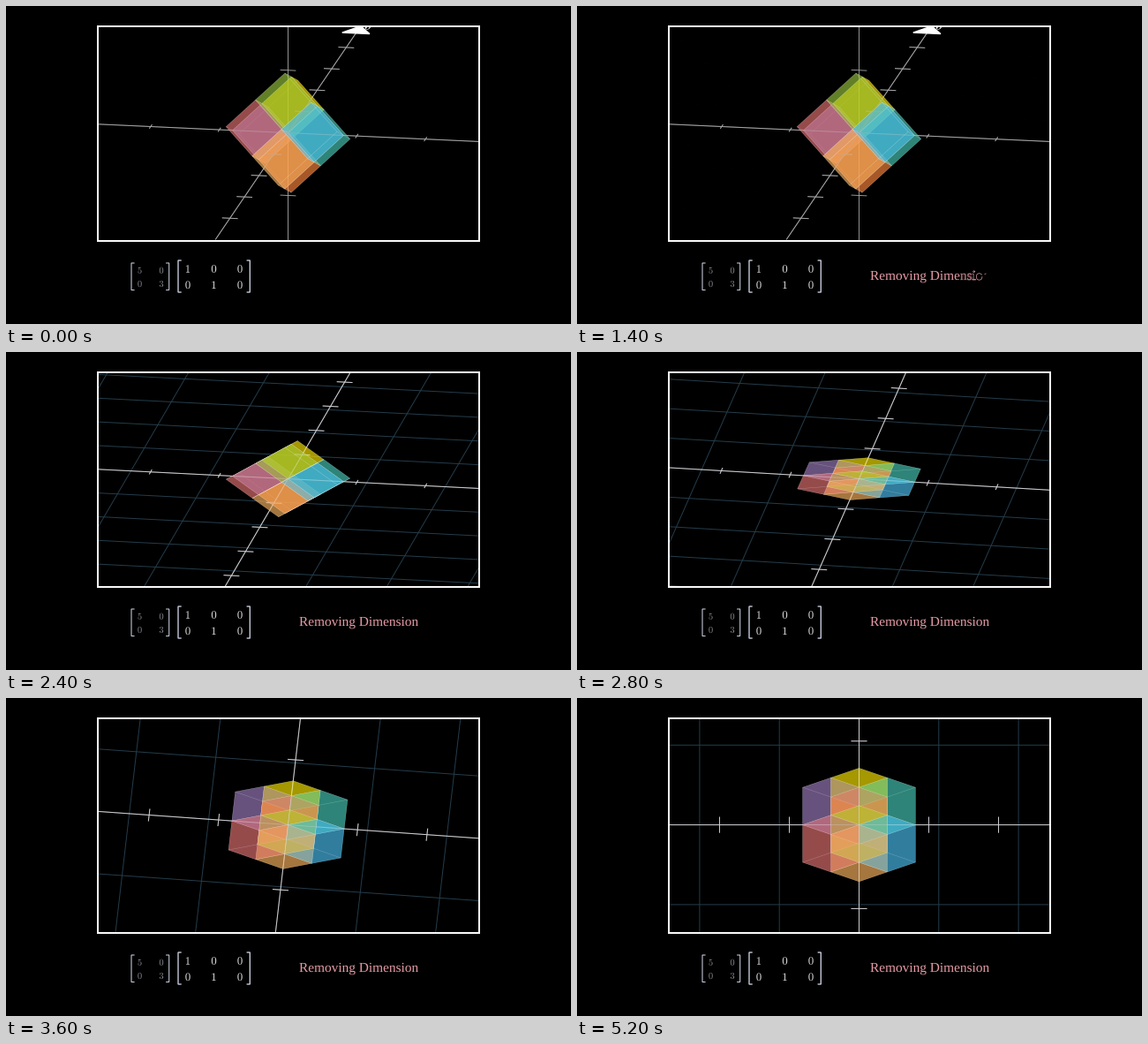
Write a matplotlib script that moves like this. It is 640 px wide and 360 px high and loops after 5.3 s.

```python
import itertools

import matplotlib.pyplot as plt
import numpy as np
from matplotlib.animation import FuncAnimation
from matplotlib.collections import LineCollection, PolyCollection
from matplotlib.patches import PathPatch, Polygon, Rectangle
from matplotlib.path import Path
from matplotlib.textpath import TextPath

plt.rcParams["mathtext.fontset"] = "cm"

W, H, DPI = 640, 360, 100
FRAMES, STEP = 53, 100
PX = 72 / DPI                      # one pixel in points
LEFT, TOP, RIGHT, BOTTOM = 104, 22.5, 536, 265.5
CENTER = np.array([319.5, 143.6])
UNIT = 90.3                        # pixels per scene unit
TICK_X, TICK_Y, TICK_Z = 0.875, 1.05, 0.8125

WHITE = "#fafafa"
PINK = "#e69ba5"
GRID = "#243c4a"
BRACKET, DULL, PALE = "#c4c8d8", "#86868e", "#dedede"
AXIS_DIM = np.array([165, 165, 165]) / 255
AXIS_LIT = np.array([205, 205, 210]) / 255

# Colour of each small cube by its corner
CUBES = {
    (1, 1, 1): (150, 195, 60),
    (1, 1, -1): (250, 230, 0),
    (1, -1, 1): (75, 190, 240),
    (1, -1, -1): (70, 200, 182),
    (-1, 1, 1): (227, 114, 114),
    (-1, 1, -1): (156, 125, 190),
    (-1, -1, 1): (250, 180, 95),
    (-1, -1, -1): (255, 134, 60),
}
FACE_ALPHA = 0.42


# --- timing -----------------------------------------------------------------
def smooth(t):
    t = np.clip(t, 0, 1)
    edge = 1 / (1 + np.exp(5))
    s = 1 / (1 + np.exp(-10 * (t - 0.5)))
    return float(np.clip((s - edge) / (1 - 2 * edge), 0, 1))


def rush_into(t):
    return 2 * smooth(np.clip(t, 0, 1) / 2)


def span(ms, start, length):
    return (ms - start) / length


# --- geometry ---------------------------------------------------------------
def tilt_cube(p):
    """Turn by 45 degrees about z, then by 70 degrees about x."""
    x, y, z = np.moveaxis(np.asarray(p, float), -1, 0)
    x, y = (x - y) / np.sqrt(2), (x + y) / np.sqrt(2)
    c, s = np.cos(np.radians(70)), np.sin(np.radians(70))
    return np.stack([x, y * c - z * s, y * s + z * c], -1)


def project(p, cam):
    """Screen points and depth; cam runs from 0 (tilted) to 1 (top view)."""
    phi, turn = np.radians(75 * (1 - cam)), np.radians(-10 * (1 - cam))
    x, y, z = np.moveaxis(np.asarray(p, float), -1, 0)
    u = x * np.cos(turn) - y * np.sin(turn)
    v = x * np.sin(turn) + y * np.cos(turn)
    up = v * np.cos(phi) + z * np.sin(phi)
    depth = z * np.cos(phi) - v * np.sin(phi)
    return CENTER + UNIT * np.stack([u, -up], -1), depth


def cube_faces():
    faces, colors = [], []
    for corner, color in CUBES.items():
        mid = 0.25 * np.array(corner)
        for axis, side in itertools.product(range(3), (-0.25, 0.25)):
            a, b = [i for i in range(3) if i != axis]
            quad = np.tile(mid, (4, 1))
            quad[:, axis] += side
            quad[:, a] += [-0.25, 0.25, 0.25, -0.25]
            quad[:, b] += [-0.25, -0.25, 0.25, 0.25]
            faces.append(quad)
            colors.append([c / 255 for c in color] + [FACE_ALPHA])
    return tilt_cube(faces), np.array(colors)


def axis_lines(axis, half, gap, tick_axis, count):
    """A line along one axis with its tick marks."""
    def point(along, across=0.0):
        p = np.zeros(3)
        p[axis] = along
        p[tick_axis] += across
        return p
    lines = [[point(-half), point(half)]]
    for n in range(-count, count + 1):
        if n:
            lines.append([point(n * gap, -0.1), point(n * gap, 0.1)])
    return lines


def grid_lines():
    rows = [[(-8, n, 0), (8, n, 0)] for n in range(-4, 5) if n]
    cols = [[(n, -7, 0), (n, 7, 0)] for n in range(-7, 8) if n]
    return np.array(rows + cols, float)


FACES, FACE_COLORS = cube_faces()
XY_AXES = np.array(axis_lines(0, 5.25, TICK_X, 1, 5)
                   + axis_lines(1, 5.25, TICK_Y, 0, 4))
Z_AXIS = np.array(axis_lines(2, 3.25, TICK_Z, 0, 3))
PLANE = grid_lines()
ARROW = np.array([(-0.175, 4.9, 0), (0.175, 4.9, 0), (0, 5.25, 0)])

# --- stage ------------------------------------------------------------------
fig = plt.figure(figsize=(W / DPI, H / DPI), dpi=DPI, facecolor="black")


def pixel_axes(x0, y0, x1, y1):
    ax = fig.add_axes([x0 / W, 1 - y1 / H, (x1 - x0) / W, (y1 - y0) / H])
    ax.set_xlim(x0, x1)
    ax.set_ylim(y1, y0)
    ax.set_axis_off()
    return ax


view = pixel_axes(LEFT, TOP, RIGHT, BOTTOM)
stage = pixel_axes(0, 0, W, H)


def add_lines(zorder, width, color=WHITE):
    lines = LineCollection([], linewidths=width * PX, colors=[color],
                           zorder=zorder, snap=False)
    return view.add_collection(lines, autolim=False)


grid = add_lines(1, 1.0, GRID)
z_axis = add_lines(2, 0.9, AXIS_DIM)
axes_under = add_lines(2, 1.0)
axes_over = add_lines(4, 1.0)
cube = PolyCollection([], zorder=3, linewidths=0.45 * PX, snap=False)
view.add_collection(cube, autolim=False)
arrow = view.add_patch(Polygon(np.zeros((3, 2)), color="white", zorder=5))
stage.add_patch(Rectangle((LEFT, TOP), RIGHT - LEFT, BOTTOM - TOP,
                          fill=False, ec=WHITE, lw=2 * PX))


# --- lettering --------------------------------------------------------------
def outline(text, size, family="Liberation Serif"):
    return TextPath((0, 0), text, size=size, prop={"family": family})


def place(path, x, y):
    return Path(path.vertices * [1, -1] + [x, y], path.codes)


def digit(text, x, y, size, color):
    path = outline(f"${text}$", size)
    box = path.get_extents()
    path = place(path, x - (box.x0 + box.x1) / 2, y + (box.y0 + box.y1) / 2)
    stage.add_patch(PathPatch(path, fc=color, lw=0))


def bracket(x, y0, y1, foot, width):
    stage.plot([x + foot, x, x, x + foot], [y0, y0, y1, y1], color=BRACKET,
               lw=width * PX, solid_joinstyle="miter", snap=False)


def matrix(rows, xs, ys, size, color, ends, reach, width):
    for row, y in zip(rows, ys):
        for text, x in zip(row, xs):
            digit(text, x, y, size, color)
    bracket(ends[0], *reach, 3, width)
    bracket(ends[1], *reach, -3, width)


matrix(["50", "03"], (151.5, 176), (299.3, 314.5), 10.5, DULL,
       (142, 184.7), (291, 321.5), 1.1)
matrix(["100", "010"], (206, 235.5, 265), (297.5, 315.7), 12.8, PALE,
       (195, 276.3), (288, 324), 1.4)

label_path = outline("$y$", 20)
label = view.add_patch(PathPatch(label_path, fc="white", lw=0, zorder=5))


class Letter:
    """One letter that is traced first and filled afterwards."""

    def __init__(self, path):
        loops = [np.vstack([loop, [np.nan, np.nan]])
                 for loop in path.to_polygons()]
        self.points = np.vstack(loops)
        self.fill = stage.add_patch(PathPatch(path, fc=PINK, lw=0))
        self.trace, = stage.plot([], [], color=PINK, lw=0.7 * PX)

    def show(self, u):
        u = float(np.clip(u, 0, 1))
        count = int(len(self.points) * min(1, 2 * u))
        self.trace.set_data(*self.points[:count].T)
        filled = max(0.0, 2 * u - 1)
        self.trace.set_alpha(1 - filled)
        self.fill.set_alpha(filled)


def caption(text, x, y, size):
    letters = []
    for i, char in enumerate(text):
        if char == " ":
            continue
        glyph = outline(char, size)
        shift = (outline(text[:i + 1], size).get_extents().x1
                 - glyph.get_extents().x1)
        letters.append(Letter(place(glyph, x + shift, y)))
    return letters


letters = caption("Removing Dimension", 332, 310, 15.35)


# --- motion -----------------------------------------------------------------
def draw_cube(cam, height):
    solid = FACES * [1, 1, height]
    # Keep a trace of tilt so that flat faces still have an order
    depth = project(solid, min(cam, 0.99))[1].mean(axis=1)
    order = np.argsort(depth, kind="stable")
    cube.set_verts(project(solid, cam)[0][order])
    cube.set_facecolor(FACE_COLORS[order])
    cube.set_edgecolor((1, 1, 1, 0.22))


def update(i):
    ms = i * STEP
    plane = smooth(span(ms, 1300, 700))
    height = 1 - smooth(span(ms, 1930, 1000))
    cam = rush_into(span(ms, 1917, 2173))

    for n, letter in enumerate(letters):
        letter.show(span(ms, 830 + 35 * n, 175))

    grid.set_segments(project(PLANE, cam)[0])
    grid.set_alpha(plane)
    z_axis.set_segments(project(Z_AXIS, cam)[0])
    z_axis.set_alpha(1 - plane)

    tint = AXIS_DIM + (AXIS_LIT - AXIS_DIM) * plane
    for lines, alpha in ((axes_under, 1), (axes_over, 0.35)):
        lines.set_segments(project(XY_AXES, cam)[0])
        lines.set_color([tint])
        lines.set_alpha(alpha)

    tip = project(ARROW, cam)[0]
    arrow.set_xy(tip)
    label.set_path(place(label_path, tip[2, 0] + 4, tip[2, 1]))
    draw_cube(cam, height)
    return []


anim = FuncAnimation(fig, update, frames=FRAMES, interval=STEP,
                     init_func=lambda: update(0), repeat=True,
                     repeat_delay=0, blit=False)
plt.show()
```
